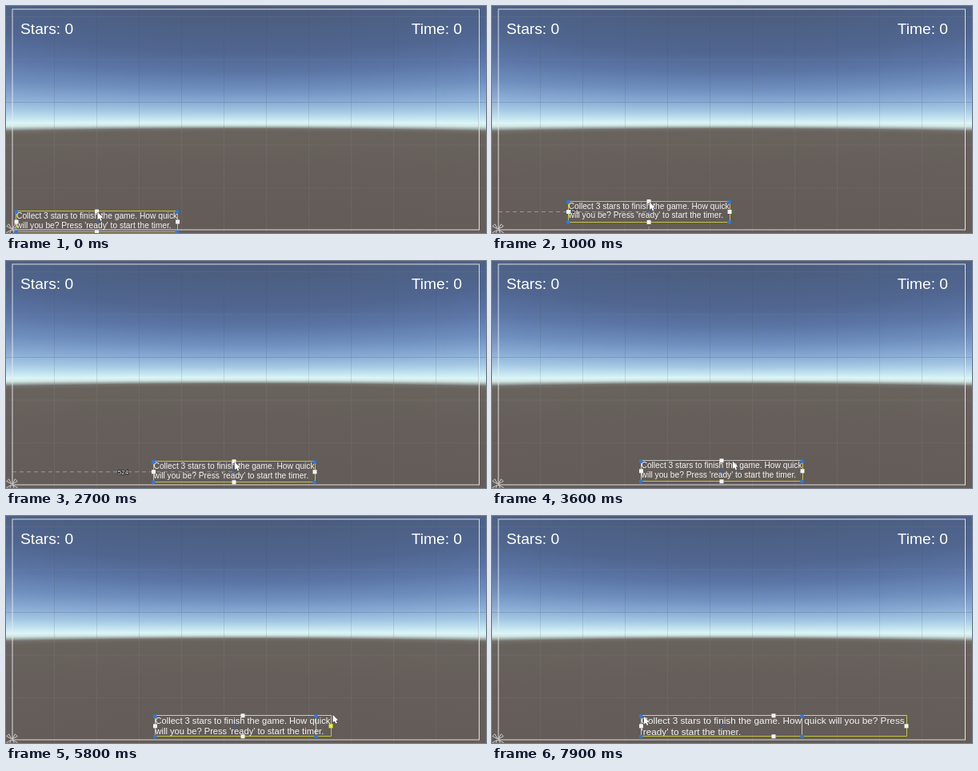
Animation, 600 px wide and 284 px high, one loop 8 s. Source, as an HTML page with a canvas:

```html
<!DOCTYPE html>
<html lang="en">
<head>
<meta charset="utf-8">
<title>Scene view layout</title>
<style>
html, body { margin: 0; width: 100%; height: 100%; overflow: hidden; background: #655e5a; }
canvas { display: block; }
</style>
</head>
<body>
<canvas id="stage" width="600" height="284"></canvas>
<script>
const W = 600, H = 284, HORIZON = 153, LOOP = 8000;
const FONT = '"Liberation Sans", Arial, sans-serif';
const YELLOW = '#c3c53c', PALE = 'rgba(225,225,222,.8)', WHITE = '#f4f4f4', BLUE = '#2f78dc';
const message = "Collect 3 stars to finish the game. How quick will you be? Press 'ready' to start the timer.";
const ctx = document.getElementById('stage').getContext('2d');

// Piecewise eased value through [time, value] points
function track(t, points) {
  let [t0, v0] = points[0];
  for (const [t1, v1] of points) {
    if (t < t1) {
      const p = (t - t0) / (t1 - t0);
      return v0 + (v1 - v0) * (0.5 * p + 0.5 * p * p * (3 - 2 * p));
    }
    [t0, v0] = [t1, v1];
  }
  return v0;
}

function line(c, x1, y1, x2, y2, color, dash = []) {
  c.strokeStyle = color;
  c.lineWidth = 1;
  c.setLineDash(dash);
  c.beginPath();
  c.moveTo(x1, y1);
  c.lineTo(x2, y2);
  c.stroke();
  c.setLineDash([]);
}

function label(c, str, x, y, size, align = 'left') {
  c.font = `${size}px ${FONT}`;
  c.textAlign = align;
  c.fillText(str, x, y);
}

function makeBackdrop() {
  const canvas = document.createElement('canvas');
  canvas.width = W;
  canvas.height = H;
  const c = canvas.getContext('2d');
  const sky = c.createLinearGradient(0, 0, 0, H);
  const stops = [[0, '#4a5b7b'], [58, '#506690'], [82, '#5a74a4'], [105, '#6f8fbe'], [120, '#87aad3'],
    [132, '#a3c7e3'], [141, '#c4e4ef'], [146, '#dbf6f6'], [149, '#d0e5e3'], [151.5, '#a0aba9'],
    [153.5, '#736f6b'], [157, '#69635e'], [200, '#655e5a'], [H, '#625b57']];
  for (const [y, color] of stops) sky.addColorStop(y / H, color);
  c.fillStyle = sky;
  // Perspective: the sky widens and the horizon sags toward both sides
  for (let x = 0; x < W; x++) {
    const side = ((x - 300) / 300) ** 2;
    const scale = 1 + .3 * side;
    c.setTransform(1, 0, 0, scale, 0, HORIZON * (1 - scale) + 3 * side);
    c.fillRect(x, 0, 1, H);
  }
  c.resetTransform();
  for (let i = 0; i < 11; i++) {
    const x = 60.5 + 53 * i;
    line(c, x, 0, x, HORIZON, 'rgba(70,80,100,.16)');
    line(c, x, HORIZON, x, H, 'rgba(150,150,150,.17)');
  }
  for (let i = 0; i < 5; i++) {
    const y = 13.5 + 53.5 * i;
    line(c, 0, y, W, y, i === 2 ? 'rgba(70,80,100,.25)' : 'rgba(140,145,150,.15)');
  }
  c.strokeStyle = 'rgba(235,235,235,.9)';
  c.strokeRect(8, 4, 583.5, 276);
  c.fillStyle = '#fff';
  label(c, 'Stars: 0', 18, 35, 19.2);
  label(c, 'Time: 0', 570, 35, 19.2, 'right');
  drawAnchor(c, 7.5, 279.5);
  return canvas;
}

function drawAnchor(c, x, y) {
  c.strokeStyle = 'rgba(240,240,240,.9)';
  for (let i = 0; i < 4; i++) {
    c.save();
    c.translate(x, y);
    c.rotate(Math.PI / 4 + i * Math.PI / 2);
    c.beginPath();
    c.moveTo(1, 0);
    c.lineTo(7.5, -2);
    c.lineTo(7.5, 2);
    c.closePath();
    c.lineWidth = .8;
    c.stroke();
    c.restore();
  }
}

// The text grows with its box up to a limit
function drawMessage(x, y, w) {
  const size = Math.min(11.75, w / 19.75);
  ctx.font = `${size}px ${FONT}`;
  const rows = [''];
  for (const word of message.split(' ')) {
    const last = rows[rows.length - 1];
    const next = last ? last + ' ' + word : word;
    if (ctx.measureText(next).width > w + 1) rows.push(word);
    else rows[rows.length - 1] = next;
  }
  ctx.fillStyle = WHITE;
  rows.forEach((row, i) => label(ctx, row, x + .5, y + size * (.9 + 1.15 * i), size));
}

function square(x, y, color = WHITE) {
  ctx.fillStyle = color;
  ctx.fillRect(x - 2.5, y - 2.5, 5, 5);
}

function dot(x, y) {
  ctx.fillStyle = BLUE;
  ctx.beginPath();
  ctx.arc(x, y, 2.4, 0, 2 * Math.PI);
  ctx.fill();
}

function drawArrow(x, y) {
  ctx.beginPath();
  [[0, 0], [0, 9.5], [2.2, 7.6], [3.8, 11], [5.4, 10.3], [3.9, 7], [6.8, 6.8]]
    .forEach(([dx, dy]) => ctx.lineTo(x + dx, y + dy));
  ctx.closePath();
  ctx.strokeStyle = 'rgba(30,30,30,.7)';
  ctx.lineWidth = 1;
  ctx.stroke();
  ctx.fillStyle = '#fff';
  ctx.fill();
}

function drawResize(x, y) {
  line(ctx, x - 4, y, x + 4, y, '#222');
  ctx.fillStyle = WHITE;
  ctx.fillRect(x - 5, y - 1.5, 2, 3);
  ctx.fillRect(x + 3, y - 1.5, 2, 3);
}

function drawGuides(x, y) {
  const color = 'rgba(200,200,200,.55)';
  line(ctx, 8, y, x, y, color, [5, 4]);
  line(ctx, x, y, x, 280, color, [5, 4]);
  const mid = (8 + x) / 2;
  const value = Math.round((x - 8) * 1.891);
  ctx.font = `8px ${FONT}`;
  ctx.textAlign = 'center';
  ctx.strokeStyle = '#2b2928';
  ctx.lineWidth = 1.5;
  ctx.strokeText(value, mid, y + 3);
  ctx.fillStyle = '#e4e4e4';
  ctx.fillText(value, mid, y + 3);
}

const backdrop = makeBackdrop();

function draw(t) {
  const x = track(t, [[0, 12.5], [1000, 95], [1600, 178.7], [2700, 184], [3200, 186]]);
  const y = track(t, [[0, 257], [1000, 244.5], [1900, 244], [2700, 250.8], [3200, 249.8]]);
  const w = track(t, [[0, 202], [5000, 202], [5800, 220], [6900, 332]]);
  const h = 26, right = x + w, bottom = y + h, cx = x + w / 2, cy = y + h / 2;
  const oldRight = x + 202;
  const moving = t >= 100 && t < 3500;
  const resizing = t >= 5000 && t < 7000;

  ctx.drawImage(backdrop, 0, 0);
  if (moving) drawGuides(x + 101, cy);
  drawMessage(x, y, w);

  const topColor = t < 1300 || (t > 2000 && t < 3500) ? YELLOW : PALE;
  const [l, r, tp, b] = [x, right, y, bottom].map(v => Math.floor(v) + .5);
  line(ctx, l, tp, r, tp, topColor);
  line(ctx, l, tp, l, b, topColor);
  line(ctx, r, tp, r, b, YELLOW);
  line(ctx, l, b, r, b, YELLOW);
  if (w > 203) line(ctx, Math.floor(oldRight) - .5, y, Math.floor(oldRight) - .5, bottom, PALE);

  ctx.strokeStyle = 'rgba(47,100,190,.65)';
  ctx.beginPath();
  ctx.arc(x + 101, cy, 2, 0, 2 * Math.PI);
  ctx.stroke();
  for (const px of [x, oldRight - .5]) {
    dot(px, y + .7);
    dot(px, bottom);
  }
  square(cx, y);
  square(cx, bottom);
  square(x + .5, cy);
  square(right, cy, resizing ? '#e9ec3a' : WHITE);

  if (t < 3500) drawArrow(cx + 1, y + 1);
  else if (resizing) drawArrow(right + 2.5, y - 1);
  else if (t >= 4100 && t < 5000) drawResize(393, 249.5);
  else if (t < 4100) drawArrow(track(t, [[3500, 288], [4100, 393]]), track(t, [[3500, 250.8], [4100, 249]]));
  else drawArrow(track(t, [[7000, 520.5], [7900, 190]]), track(t, [[7000, 249], [7900, 251]]));
}

function frame(now) {
  draw(now % LOOP);
  requestAnimationFrame(frame);
}
requestAnimationFrame(frame);
</script>
</body>
</html>
```
